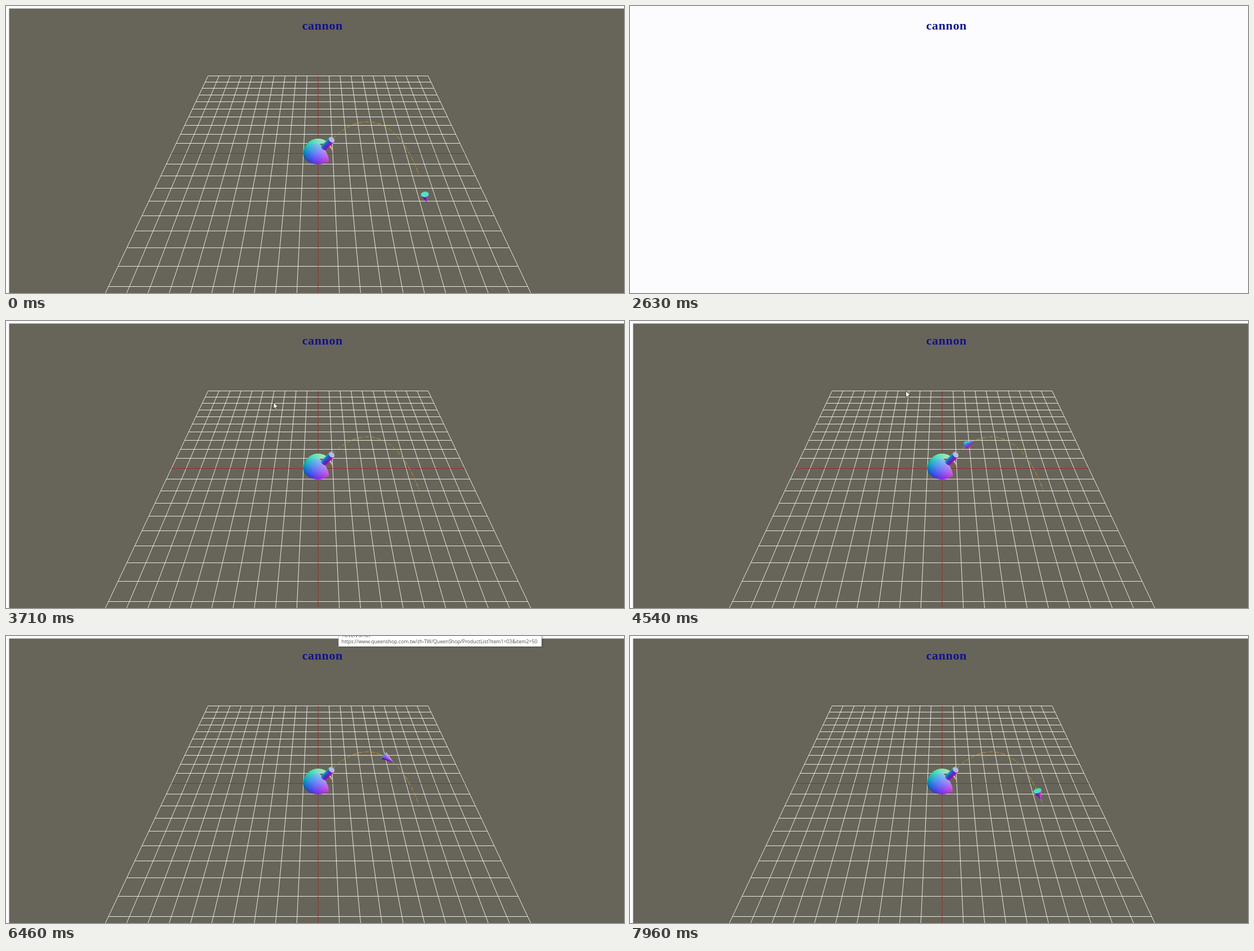
An HTML page with a canvas that plays this animation: 1097 by 511 pixels, repeating every 8000 ms.

```html
<!DOCTYPE html>
<html lang="en">
<head>
<meta charset="utf-8">
<title>cannon</title>
<style>
  html, body { margin: 0; width: 100%; height: 100%; overflow: hidden; background: #fcfcfe; }
  canvas, svg { position: absolute; left: 0; top: 0; width: 1097px; height: 511px; }
  .title { font: bold 22px "Liberation Serif", "Times New Roman", serif; letter-spacing: .6px; fill: #10128c; }
  .tip text { font: 8.8px "Open Sans", "Noto Sans", sans-serif; fill: #505050; }
</style>
</head>
<body>
<canvas id="view" width="1097" height="511"></canvas>
<svg viewBox="0 0 1097 511">
  <text class="title" x="561.8" y="42" text-anchor="middle">cannon</text>
  <g class="tip" id="tip">
    <rect x="592" y="-12" width="362" height="33" fill="#000" opacity=".12"/>
    <rect x="590.5" y="-14.5" width="360" height="33" fill="#fff" stroke="#c4c4c4"/>
    <text x="595.5" y="1.6">TOVEN SHOP</text>
    <text x="595.5" y="12.8">https://www.queenshop.com.tw/zh-TW/QueenShop/ProductList?item1=03&amp;item2=50</text>
  </g>
  <path id="cursor" d="M0 0V11.2L2.6 8.8L4.3 12.6L6.1 11.8L4.4 8.1H8Z" fill="#fff" stroke="#222" stroke-width=".8"/>
</svg>
<script>
const LOOP = 8000, TAU = Math.PI * 2, R2 = Math.SQRT1_2;
const FOCAL = 552.5, CX = 554, CY = 262.7, EYE = 15;
const ctx = document.getElementById('view').getContext('2d');
const tip = document.getElementById('tip');
const cursor = document.getElementById('cursor');

// Camera at (0, EYE, EYE) looking at the origin.
function project([x, y, z]) {
  const s = FOCAL / ((2 * EYE - y - z) * R2);
  return [CX + x * s, CY - (y - z) * R2 * s];
}

// The shot stays in a vertical plane turned by AIM around the y axis.
const AIM = Math.atan(0.5), AIM_C = Math.cos(AIM), AIM_S = Math.sin(AIM);
const aimed = ([r, y, side]) => [r * AIM_C - side * AIM_S, y, r * AIM_S + side * AIM_C];

function normalColor([x, y, z]) {
  const c = v => Math.round((v * 0.5 + 0.5) * 255);
  return `rgb(${c(x)},${c((y - z) * R2)},${c((y + z) * R2)})`;
}

function tween(keys, t) {
  let i = 0;
  while (i < keys.length - 2 && t > keys[i + 1][0]) i++;
  const [a, b] = [keys[i], keys[i + 1]];
  const k = Math.min(1, Math.max(0, (t - a[0]) / (b[0] - a[0])));
  return a.slice(1).map((v, j) => v + (b[j + 1] - v) * k);
}

function face(points, normal) {
  const mid = [0, 1, 2].map(i => points.reduce((s, p) => s + p[i], 0) / points.length);
  const facing = -normal[0] * mid[0] + normal[1] * (EYE - mid[1]) + normal[2] * (EYE - mid[2]);
  return facing > 0 ? [{ points, color: normalColor(normal), near: mid[1] + mid[2] }] : [];
}

// Upper half sphere with one eighth left open.
function dome() {
  const faces = [], across = 42, up = 12;
  const at = (u, v) => {
    const a = TAU / 8 + u / across * TAU * 7 / 8, b = v / up * TAU / 4;
    return [Math.cos(a) * Math.cos(b), Math.sin(b), Math.sin(a) * Math.cos(b)];
  };
  for (let u = 0; u < across; u++) for (let v = 0; v < up; v++)
    faces.push(...face([at(u, v), at(u + 1, v), at(u + 1, v + 1), at(u, v + 1)], at(u + 0.5, v + 0.5)));
  return faces;
}

// Cylinder or cone whose axis lies in the plane of the shot.
function frustum([x, y], angle, length, r0, r1) {
  const c = Math.cos(angle), s = Math.sin(angle), n = 24;
  const slope = Math.atan2(r0 - r1, length), faces = [];
  const radial = i => {
    const a = i / n * TAU;
    return [-s * Math.cos(a), c * Math.cos(a), Math.sin(a)];
  };
  const at = (i, d, r) => {
    const e = radial(i);
    return aimed([x + c * d + e[0] * r, y + s * d + e[1] * r, e[2] * r]);
  };
  for (let i = 0; i < n; i++) {
    const e = radial(i + 0.5), k = Math.cos(slope), m = Math.sin(slope);
    faces.push(...face([at(i, 0, r0), at(i + 1, 0, r0), at(i + 1, length, r1), at(i, length, r1)],
      aimed([e[0] * k + c * m, e[1] * k + s * m, e[2] * k])));
  }
  const ring = (d, r) => Array.from({ length: n }, (_, i) => at(i, d, r));
  faces.push(...face(ring(0, r0), aimed([-c, -s, 0])));
  if (r1) faces.push(...face(ring(length, r1), aimed([c, s, 0])));
  return faces;
}

const cannon = [...dome(), ...frustum([0.45, 0.78], TAU / 6, 1.03, 0.2, 0.2)];

const APEX = [3.656, 4.01], BEND = 0.32;
const height = r => APEX[1] - BEND * (r - APEX[0]) ** 2;

function shell(r) {
  const a = Math.atan(-2 * BEND * (r - APEX[0])), len = 0.6;
  const base = [r - Math.cos(a) * len / 2, height(r) - Math.sin(a) * len / 2];
  return frustum(base, a, len, 0.225, 0);
}

function line(points, color, dash = []) {
  ctx.beginPath();
  points.forEach(p => ctx.lineTo(...p));
  ctx.strokeStyle = color;
  ctx.lineWidth = 1;
  ctx.setLineDash(dash);
  ctx.stroke();
  ctx.setLineDash([]);
}

function drawGrid() {
  const row = (z, color) => {
    const ends = [-10, 10].map(x => project([x, 0, z]));
    line(ends.map(([x, y]) => [x, Math.floor(y) + 0.5]), color);
  };
  const column = (x, color) => line([project([x, 0, -10]), project([x, 0, 10])], color);
  for (let i = -10; i <= 10; i++) if (i) {
    row(i, '#e9e9df');
    column(i, '#e9e9df');
  }
  row(0, '#982c2e');
  column(0, '#99302f');
}

function drawFaces(faces) {
  ctx.lineWidth = 0.4;
  ctx.lineJoin = 'round';
  for (const f of [...faces].sort((a, b) => a.near - b.near)) {
    ctx.beginPath();
    f.points.forEach(p => ctx.lineTo(...project(p)));
    ctx.closePath();
    ctx.fillStyle = ctx.strokeStyle = f.color;
    ctx.fill();
    ctx.stroke();
  }
}

const SPEED = 1.282 / 1000, FIRE = 3840, GONE = 670;
const POINTER = [[3250, 390, -16], [3650, 475, 145], [4480, 475, 145], [4950, 590, -16]];

function shellAt(t) {
  if (t < GONE) return shell(7.435 + SPEED * Math.max(0, t - 130));
  return t < FIRE ? [] : shell(0.957 + SPEED * (t - FIRE));
}

function render(t) {
  const blank = t >= 2630 && t < 2790;
  ctx.fillStyle = '#fcfcfe';
  ctx.fillRect(0, 0, 1097, 511);
  if (!blank) {
    ctx.fillStyle = '#67645a';
    ctx.fillRect(5.5, 4.5, 1092, 507);
    drawGrid();
    const arc = Array.from({ length: 61 }, (_, i) => {
      const r = 1 + i / 60 * 5.62;
      return project(aimed([r, height(r), 0]));
    });
    line(arc, '#c79c2c', [8, 3]);
    drawFaces([...cannon, ...shellAt(t)]);
  }
  const [px, py] = tween(POINTER, t);
  cursor.setAttribute('transform', `translate(${px} ${py})`);
  tip.setAttribute('opacity', t < 5800 ? 0 : tween([[7880, 1], [7955, 0]], t)[0]);
}

let start;
function tick(now) {
  start ??= now;
  render((now - start) % LOOP);
  requestAnimationFrame(tick);
}
render(0);
requestAnimationFrame(tick);
</script>
</body>
</html>
```
